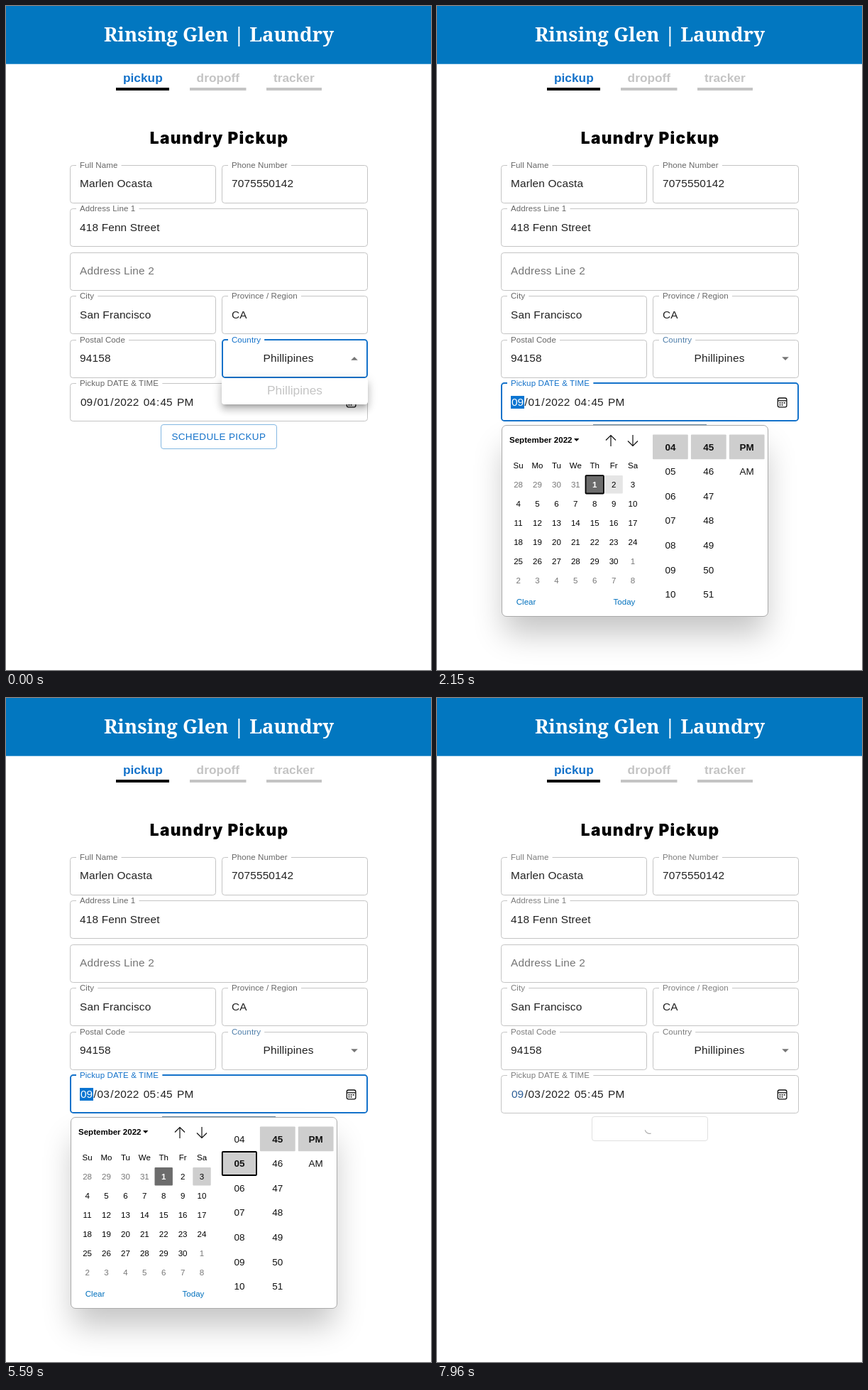
Write an HTML page that moves like this. It is 599 by 935 pixels and loops after 7.99 s.

```html
<!DOCTYPE html>
<html lang="en">
<head>
<meta charset="utf-8">
<title>Laundry Pickup</title>
<style>
html, body { margin: 0; width: 100%; height: 100%; overflow: hidden; background: #fff; }
svg { position: absolute; left: 0; top: 0; width: 599px; height: 935px; }
text { font: 15.4px "Liberation Sans", Arial, sans-serif; white-space: pre; }
.mid { text-anchor: middle; }
.brand { font: bold 27.4px "Noto Serif", serif; }
.head { font: 900 22.6px Inter, sans-serif; letter-spacing: 1.3px; }
.tab { font-size: 17.3px; font-weight: bold; }
.label { font-size: 11.54px; letter-spacing: .11px; }
.value { letter-spacing: .15px; }
.btn { font-size: 13.46px; letter-spacing: .39px; }
.day { font-size: 11.54px; }
.time { font-size: 13.46px; }
.bold { font-weight: bold; }
#menu, #panel { position: absolute; box-sizing: border-box; background: #fff; }
#menu { left: 304px; top: 524px; width: 206px; height: 37px; border-radius: 4px; transform-origin: 50% 0;
  font: 17.3px/34px "Liberation Sans", Arial, sans-serif; text-align: center; color: #c4c4c4;
  box-shadow: 0 5px 5px -3px #0003, 0 8px 10px 1px #00000024, 0 3px 14px 2px #0000001f; }
#panel { left: 90.5px; top: 589.5px; width: 376.5px; height: 270px; border: 1px solid #aaa; border-radius: 7px;
  box-shadow: 0 28px 44px -4px rgba(0,0,0,.23); }
</style>
</head>
<body>
<svg id="form"></svg>
<div id="menu">Phillipines</div>
<div id="panel"></div>
<svg id="front"></svg>
<script>
const LOOP = 7990, SUBMIT = 7710, BLUE = '#1472ca', INK = '#212121', GREY = '#c4c4c4';
const $ = id => document.getElementById(id);
const clamp = x => Math.max(0, Math.min(1, x));
const ramp = (t, from, to) => { const x = clamp((t - from) / (to - from)); return x * x * (3 - 2 * x); };
const mix = (a, b, k) => `rgb(${a.map((v, i) => Math.round(v + (b[i] - v) * k))})`;
const between = (t, a, b) => t >= a && t < b;
// value of the last [time, value] step that has begun
const at = (steps, t) => steps.reduce((v, [from, next]) => t >= from ? next : v, null);

const blueRgb = [20, 114, 202], greyRgb = [102, 102, 102], paleRgb = [124, 124, 124], steelRgb = [78, 126, 170];

const text = (x, y, s, cls, fill = INK) => `<text x="${x}" y="${y}" class="${cls}" fill="${fill}">${s}</text>`;
const rect = (x, y, w, h, fill, extra = '') => `<rect x="${x}" y="${y}" width="${w}" height="${h}" fill="${fill}" ${extra}/>`;
const path = (d, extra) => `<path d="${d}" ${extra}/>`;

const ruler = document.createElement('canvas').getContext('2d');
ruler.font = '11.54px "Liberation Sans", Arial, sans-serif';

// borders and baselines sit on whole pixels
function field(x, row, w, label, labelFill, value, border = GREY, stroke = 1) {
  const top = Math.floor(224.4 + row * 61.5), thick = stroke > 1;
  let s = rect(thick ? x + .5 : x, thick ? top : top + .5, thick ? w - 1 : w, 53, 'none',
    `rx="3.8" stroke="${border}" stroke-width="${stroke}"`);
  if (label) {
    const width = ruler.measureText(label).width + label.length * .11;
    s += rect(x + 8.5, top - 2, width + 10, 5, '#fff') + text(x + 13.4, top + 4, label, 'label', labelFill);
  }
  return s + value(x + 13.6, Math.floor(255.5 + row * 61.5));
}
const plain = (s, fill) => (x, y) => text(x, y, s, 'value', fill);

function dateValue(t) {
  const focused = between(t, 550, 6750);
  const day = t < 3140 ? '01' : '03', hour = t < 4300 ? '04' : '05';
  const first = focused ? '#fff' : t < 550 ? INK : '#2d5f98';
  const parts = [[123.4, '/'], [128.6, day], [147.3, '/'], [152.5, '2022'], [193.8, hour], [212, ':'], [217.4, '45'], [241, 'PM']];
  return (x, y) => (focused ? rect(104, 549, 19, 18, '#0b75d1') : '') +
    text(104.9, y, '09', 'value', first) + parts.map(([px, s]) => text(px, y, s, 'value')).join('');
}

function dateIcon() {
  let s = rect(480.3, 552, 12.6, 12.8, 'none', 'rx="2.4" stroke="#111" stroke-width="1.3"') +
    path('M480.3 555.8h12.6', 'stroke="#111" stroke-width="1.3"');
  for (let i = 0; i < 5; i++) s += rect(482.6 + i % 3 * 3.1, 558 + (i / 3 | 0) * 2.9, 1.7, 1.7, '#111');
  return s;
}

function drawForm(t) {
  const done = ramp(t, SUBMIT, SUBMIT + 200), lab = mix(greyRgb, paleRgb, done);
  const country = t < SUBMIT ? mix(blueRgb, steelRgb, ramp(t, 550, 750)) : mix(steelRgb, paleRgb, done);
  const dateLabel = t < 6750 ? mix(greyRgb, blueRgb, ramp(t, 550, 690))
    : t < SUBMIT ? mix(blueRgb, greyRgb, ramp(t, 6750, 6960)) : lab;
  const countryOn = t < 550, dateOn = between(t, 550, 6750), dateHover = between(t, 340, 550);
  const tabs = [['pickup', 165, 155, 75], ['dropoff', 268.6, 259, 79.5], ['tracker', 377, 367, 78]];
  return rect(0, 0, 599, 81.7, '#0277c0') +
    text(300, 50, 'Rinsing Glen | Laundry', 'brand mid', '#fff') +
    tabs.map(([s, x, bar, w], i) => text(x, 106.5, s, 'tab', i ? GREY : BLUE) +
      rect(bar, 115, w, 4, i ? GREY : '#000')).join('') +
    text(300.6, 194, 'Laundry Pickup', 'head mid', '#000') +
    field(90.5, 0, 205, 'Full Name', lab, plain('Marlen Ocasta')) +
    field(304.5, 0, 205, 'Phone Number', lab, plain('7075550142')) +
    field(90.5, 1, 419, 'Address Line 1', lab, plain('418 Fenn Street')) +
    field(90.5, 2, 419, '', lab, plain('Address Line 2', '#757575')) +
    field(90.5, 3, 205, 'City', lab, plain('San Francisco')) +
    field(304.5, 3, 205, 'Province / Region', lab, plain('CA')) +
    field(90.5, 4, 205, 'Postal Code', lab, plain('94158')) +
    field(304.5, 4, 205, 'Country', country, (x, y) => text(362.6, y, 'Phillipines', 'value') +
      path(t < 140 ? 'M486.2 498.8h9.6l-4.8-4.8z' : 'M486.2 494.2h9.6l-4.8 4.8z', 'fill="#757575"'),
      countryOn ? BLUE : GREY, countryOn ? 2 : 1) +
    field(90.5, 5, 419, 'Pickup DATE & TIME', dateLabel, dateValue(t),
      dateOn ? BLUE : dateHover ? INK : GREY, dateOn ? 2 : 1) + dateIcon();
}

function spinner(ms) {
  const p = ms / 1400 % 1, grow = ramp(p, 0, .5), slide = ramp(p, .5, 1);
  const dash = 1 + 99 * grow, offset = -15 * grow - 110 * slide;
  return `<g transform="translate(300 606.3) rotate(${p * 360}) scale(.35)"><circle r="20.2" fill="none" stroke="#000" stroke-opacity=".32" stroke-width="3.6" stroke-dasharray="${dash} 200" stroke-dashoffset="${offset}"/></g>`;
}

function button(t) {
  const busy = ramp(t, SUBMIT, SUBMIT + 250), border = mix([132, 184, 226], [224, 224, 224], busy);
  let s = '';
  if (between(t, 7370, SUBMIT)) {
    const k = ramp(t, 7370, 7920);
    s += `<clipPath id="face"><rect x="219" y="590" width="162" height="33" rx="3"/></clipPath>
      <circle cx="300" cy="606" r="${k * 85}" fill="${BLUE}" opacity="${.1 + .2 * k}" clip-path="url(#face)"/>`;
  }
  s += rect(218.5, 589.5, 163, 34, 'none', `rx="3.5" stroke="${border}"`);
  if (busy < 1) s += `<g opacity="${1 - busy}">${text(233.4, 611, 'SCHEDULE PICKUP', 'btn', BLUE)}</g>`;
  return t < SUBMIT ? s : s + spinner(t - SUBMIT);
}

const PITCH = 26.9, ROW = 34.6;
const dayHover = [[1220, 4], [1770, 5], [1840, 6], [1910, 7], [1980, 8], [2060, 9], [2150, 2], [2730, 3], [3410, 0]];
const timeHover = [[3480, '06'], [3550, '05'], [3590, '06'], [3620, ''], [4030, '05'], [4400, ''], [4640, '46'],
  [5590, ''], [6210, 'AM'], [6310, '']];
const frame = on => on ? 'stroke="#000" stroke-width="1.8" rx="1"' : 'rx="1"';

function calendar(t) {
  const chosen = t < 3140 ? 1 : 3, hover = at(dayHover, t);
  let s = text(102, 615, 'September 2022', 'day bold', '#000') + path('M193 609h7.4l-3.7 4z', 'fill="#000"');
  if (between(t, 1040, 1220)) s += rect(263, 600, 26, 23.5, '#e5e5e5');
  s += path('M245 620V604.5m-7 7l7-7 7 7M276 604v15.5m-7-7l7 7 7-7', 'fill="none" stroke="#111" stroke-width="1.2"');
  ['Su', 'Mo', 'Tu', 'We', 'Th', 'Fr', 'Sa'].forEach((d, i) => s += text(114.6 + i * PITCH, 651, d, 'day mid', '#000'));
  for (let i = 0; i < 42; i++) {
    const n = i - 3, inside = n > 0 && n < 31, label = n < 1 ? n + 31 : n > 30 ? n - 30 : n;
    const x = 114.6 + i % 7 * PITCH, y = 673.8 + (i / 7 | 0) * PITCH;
    const fill = n === 1 ? '#6c6c6c' : n === chosen ? '#cecece' : inside && n === hover ? '#e5e5e5' : '';
    if (fill) s += rect(x - 12.7, y - 12.7, 25.4, 25.4, fill, frame(n === chosen && t < 4300));
    s += text(x, y + 4.2, label, 'day mid' + (n === 1 ? ' bold' : ''), n === 1 ? '#fff' : inside ? '#000' : '#767676');
  }
  return s + text(111.8, 843, 'Clear', 'day', '#0070bd') + text(248.6, 843, 'Today', 'day', '#0070bd');
}

function clock(t) {
  const hour = t < 4300 ? '04' : '05', hover = at(timeHover, t);
  const focus = t >= 5760 ? '45' : t >= 4300 ? '05' : '';
  const run = from => Array.from({ length: 7 }, (_, i) => String(from + i).padStart(2, '0'));
  return [run(4), run(45), ['PM', 'AM']].map((list, c) => list.map((label, r) => {
    const x = 304 + c * 53.9, y = 603.6 + r * ROW, on = [hour, '45', 'PM'].includes(label);
    const fill = on ? '#cecece' : label === hover ? '#e5e5e5' : '';
    const inset = label === focus ? .8 : 0;
    return (fill ? rect(x + inset, y + inset, 49.8 - 2 * inset, ROW - 2 * inset, fill, frame(inset)) : '') +
      text(x + 24.9, y + 22, label, 'time mid' + (on ? ' bold' : ''), '#111');
  }).join('')).join('');
}

// the button's top border, peeking out above the picker
function edge(t) {
  const k = t < 1220 ? ramp(t, 980, 1080) : t < 6450 ? 1 - ramp(t, 1220, 1290) : ramp(t, 6450, 6550);
  return rect(220, 589, 160, 1, mix([104, 138, 165], blueRgb, k));
}

const cache = {};
function put(id, html) {
  if (cache[id] !== html) $(id).innerHTML = cache[id] = html;
}

function draw(now) {
  const t = now % LOOP;
  put('form', drawForm(t));
  put('front', between(t, 680, 6750) ? calendar(t) + clock(t) + edge(t) : button(t));
  const fade = ramp(t, 140, 340), shrink = ramp(t, 207, 340);
  $('menu').style.opacity = 1 - fade;
  $('menu').style.transform = `scale(${1 - .25 * shrink}, ${1 - .4375 * shrink})`;
  $('panel').style.display = between(t, 650, 6750) ? 'block' : 'none';
  $('panel').style.borderWidth = t < 680 ? '2px' : '1px';
}

const start = performance.now();
function tick() {
  draw(performance.now() - start);
  requestAnimationFrame(tick);
}
tick();
</script>
</body>
</html>
```
